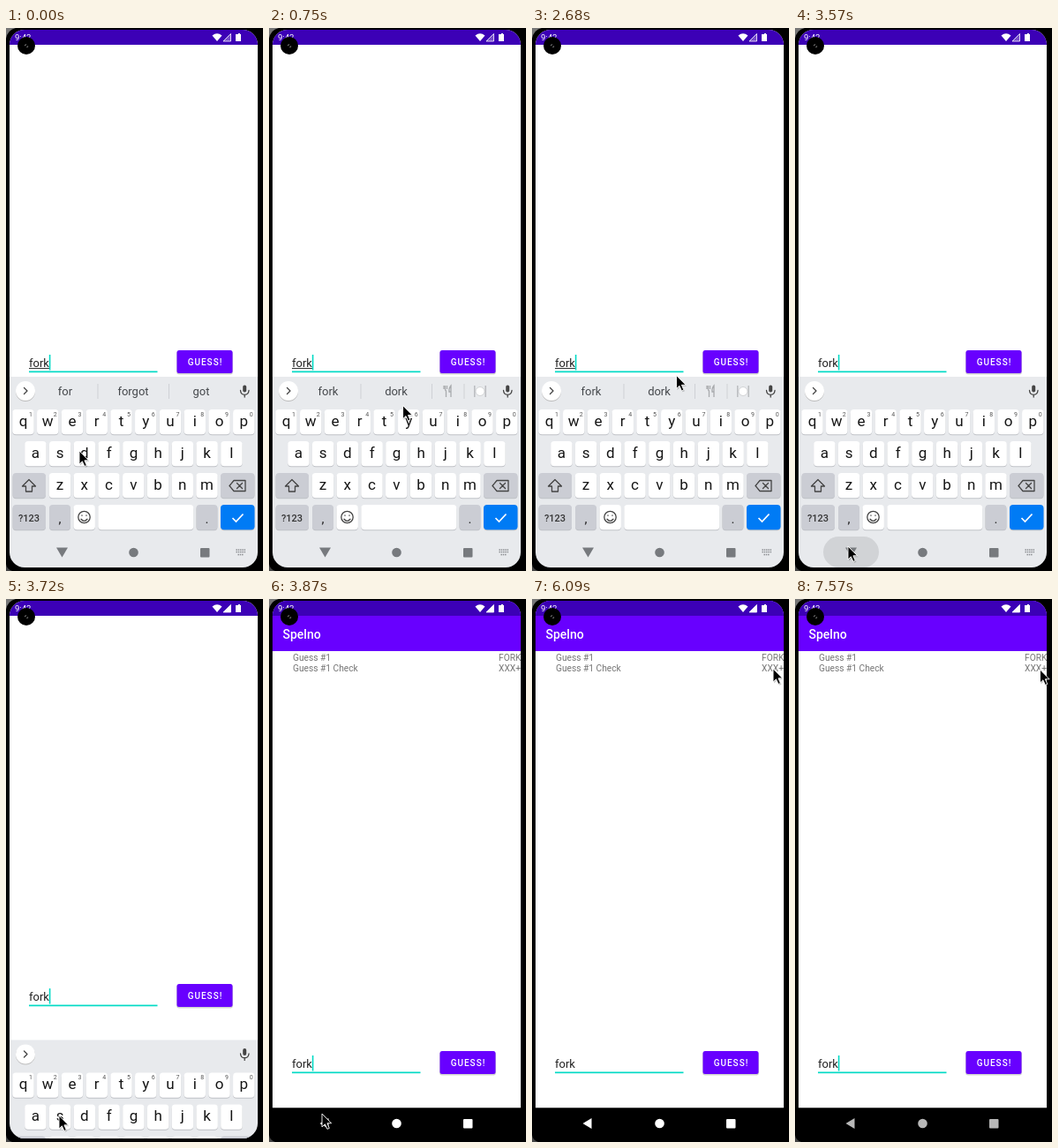
Write an HTML page that moves like this. It is 291 px wide and 615 px high and loops after 8 s.

```html
<!DOCTYPE html>
<html lang="en">
<head>
<meta charset="utf-8">
<title>Word guessing app</title>
<style>
  html, body { margin: 0; width: 100%; height: 100%; overflow: hidden; background: #000; }
  svg { display: block; width: 291px; height: 615px; font-family: Roboto, sans-serif; }
  .mid { text-anchor: middle; }
  .line { fill: none; stroke: #444; stroke-width: 1.3; stroke-linejoin: round; stroke-linecap: round; }
</style>
</head>
<body>
<svg viewBox="0 0 291 615">
  <defs>
    <clipPath id="screen"><rect x="4" y="2" width="281" height="609" rx="17"/></clipPath>
  </defs>
  <rect width="291" height="615"/>
  <path d="M0 0H11Q2 2 0 12Z" fill="#777"/>
  <path d="M0 615V607Q1 613 7 615Z" fill="#444"/>

  <g clip-path="url(#screen)">
    <rect x="4" y="2" width="281" height="574.5" fill="#fff"/>
    <g id="page">
      <rect x="4" y="2" width="281" height="57" fill="#6800ff"/>
      <text x="15.5" y="45" font-size="14" font-weight="500" fill="#fff">Spelno</text>
      <g font-size="10.2" fill="#757575">
        <text x="27" y="70">Guess #1</text>
        <text x="27" y="82">Guess #1 Check</text>
        <text x="260" y="70">FORK</text>
        <text x="260" y="82">XXX+</text>
      </g>
      <text x="26" y="530.5" font-size="13" fill="#222">fork</text>
      <rect id="composing" x="26" y="532" width="23" height="1" fill="#333"/>
      <rect x="26" y="535.5" width="145.5" height="1.7" fill="#03dac5"/>
      <rect id="caret" x="48.8" y="517" width="1.6" height="17.5" fill="#03dac5"/>
      <rect x="193" y="513" width="64" height="26.5" rx="3" fill="#000" opacity=".18"/>
      <rect x="193.5" y="512" width="63" height="26" rx="2.5" fill="#6800ff"/>
      <rect id="press" x="193.5" y="512" width="63" height="26" rx="2.5" fill="#8a1cff"/>
      <text x="225.5" y="529" class="mid" font-size="10" font-weight="500" letter-spacing="1" fill="#fff">GUESS!</text>
    </g>

    <rect x="4" y="576.5" width="281" height="35"/>
    <g id="nav" fill="#fff">
      <path d="M57.5 594L67.5 588V600Z"/>
      <circle cx="144.5" cy="594" r="5.3"/>
      <rect x="220" y="589" width="10.5" height="10.5" rx="1"/>
    </g>

    <g id="keyboard">
      <rect x="4" y="395" width="281" height="216" fill="#e8eaed"/>
      <circle cx="22" cy="412" r="11" fill="#bbb"/>
      <circle cx="22" cy="411" r="11" fill="#fff"/>
      <path d="M20.5 407.5L24 411L20.5 414.5" class="line"/>
      <g id="words"></g>
      <rect x="268.2" y="404.5" width="4" height="8" rx="2" fill="#444"/>
      <path d="M265.5 410.5Q265.8 415.3 270.2 415.3T275 410.5M270.2 415.5V418" class="line"/>
      <g id="keys"></g>
      <rect id="ripple" x="32" y="576" width="63" height="35" rx="17.5" fill="#d1d3d6"/>
      <g fill="#777a7e">
        <path d="M57 588.5H70L63.5 599.5Z"/>
        <circle cx="144.5" cy="594" r="5.3"/>
        <rect x="220" y="589" width="10.5" height="10.5" rx="1"/>
      </g>
      <path d="M260.5 591H271M260.5 593.5H271M262.5 596.5H269" stroke="#85888c" stroke-width="1.4" stroke-dasharray="1.4 .9"/>
    </g>

    <rect x="4" y="2" width="281" height="17" fill="#3c00b6"/>
    <text x="10" y="14" font-size="9.5" fill="#fff">9:42</text>
    <g fill="#fff">
      <path d="M233.5 8.5Q239 4 244.5 8.5L239 15Z"/>
      <path id="signal" d="M246 15L254.5 6.5V15Z" stroke="#fff" stroke-width=".8"/>
      <path d="M261 7H263V6H265V7H266V15H260V7Z"/>
    </g>
  </g>
  <circle cx="23" cy="20" r="10"/>
  <path d="M21 20L23 18.5M23.5 22L25 20.5" stroke="#666" stroke-width="1.3"/>

  <g id="pointer">
    <path d="M1 1.5V16.5L4.5 13.2L7 18.7L9.4 17.7L7 12.2H11.5Z" opacity=".2"/>
    <path d="M0 0V15L3.4 11.8L5.9 17.4L8.3 16.4L5.9 10.8H10.6Z" stroke="#fff" stroke-width=".9"/>
  </g>
</svg>
<script>
const $ = id => document.getElementById(id);
const clamp = v => Math.max(0, Math.min(1, v));
const label = (x, y, size, color, text, extra = '') =>
  `<text class="mid" x="${x}" y="${y}" font-size="${size}" fill="${color}" ${extra}>${text}</text>`;

function key(x, y, width, fill = '#fff') {
  const box = (top, color) =>
    `<rect x="${x}" y="${top}" width="${width}" height="28.3" rx="4" fill="${color}"/>`;
  return box(y + 1, '#bfc1c6') + box(y, fill);
}

function buildKeys() {
  const pitch = 27.75, grey = '#cbcdd4';
  const rows = [['qwertyuiop', 19.5, 432], ['asdfghjkl', 33.4, 468], ['zxcvbnm', 61, 504]];
  let out = '';
  rows.forEach(([letters, start, y], row) => [...letters].forEach((letter, i) => {
    const x = start + i * pitch;
    out += key(x - 12.2, y, 24.4) + label(x, y + 19, 17, '#151515', letter);
    if (row === 0) out += label(x + 8.5, y + 7.5, 7, '#555', (i + 1) % 10);
  }));
  out += key(7.5, 504, 37.5, grey) + key(243, 504, 38.5, grey) + key(7.5, 540, 37.5, grey)
    + key(49, 540, 24, grey) + key(76.5, 540, 24.4) + key(104.3, 540, 108)
    + key(215.5, 540, 24, grey) + key(243, 540, 38.5, '#007bf5');
  out += label(26, 559, 11, '#333', '?123', 'font-weight="500"')
    + label(61, 561, 15, '#222', ',') + label(227.5, 561, 15, '#222', '.');
  out += `<path class="line" d="M26 511.5L18.5 519H22.5V525H29.5V519H33.5Z"/>
    <path class="line" d="M253 518.5L258 512.5H271V524.5H258ZM261.5 515.5L267.5 521.5M267.5 515.5L261.5 521.5"/>
    <circle class="line" cx="88.5" cy="554" r="6.7"/>
    <path class="line" d="M85 556.3Q88.5 560.3 92 556.3M86 552V552.3M91 552V552.3"/>
    <path d="M256.5 555L260.5 559L268.5 550.5" fill="none" stroke="#fff" stroke-width="1.7"/>`;
  return out;
}

const words = list => list.map((word, i) => label(67 + 77 * i, 416, 13, '#45484c', word)).join('');
const dividers = xs => xs.map(x => `<path d="M${x} 403V420" stroke="#cfd1d5"/>`).join('');
const cutlery = `<path d="M199.5 405V408Q199.5 411 200.5 411V418M198 405V409M201.5 405V409M206 418V405Q203.5 408 204 412H206"
    fill="none" stroke="#a9abae" stroke-width="1.3"/>
  <circle cx="239" cy="411.5" r="5" fill="#fff" stroke="#d2d3d5"/>
  <path d="M232.8 405V418M245.2 405V418" stroke="#b4b6b9" stroke-width="1.3"/>`;
const suggestions = {
  typing: words(['for', 'forgot', 'got']) + dividers([104, 184.5]),
  typed: words(['fork', 'dork']) + dividers([104, 184.5, 221]) + cutlery,
  none: ''
};

// Pointer path: time, x, y
const path = [
  [0, 83, 479], [290, 85, 477], [600, 125, 447], [900, 180, 407], [1180, 212, 379], [1340, 214, 375],
  [1490, 210.5, 339], [1780, 208, 311.5], [2340, 208, 311.5], [2700, 160, 400], [3000, 90, 540],
  [3270, 60, 583], [3420, 60, 586], [3570, 60, 587], [3860, 60, 583], [4020, 63, 572],
  [4460, 122, 345], [4750, 160.5, 140], [5100, 215, 95], [5480, 254, 77.5], [5780, 255, 78],
  [6080, 273, 79], [6800, 276, 79], [7150, 277, 75], [7560, 277.5, 80], [8000, 277.5, 80]
];

function pointerAt(t) {
  const i = Math.max(1, path.findIndex(p => p[0] >= t));
  const [t0, x0, y0] = path[i - 1], [t1, x1, y1] = path[i];
  const k = (t - t0) / (t1 - t0);
  return [x0 + (x1 - x0) * k, y0 + (y1 - y0) * k];
}

const step = 148.35;
const hold = t => t < 300 ? 0 : 300 + Math.floor((t - 300) / step) * step;
const show = (id, visible) => $(id).setAttribute('visibility', visible ? 'visible' : 'hidden');
const move = (id, x, y) => $(id).setAttribute('transform', `translate(${x} ${y})`);

let shownWords;
function draw(time) {
  const t = hold(time);
  const closing = clamp((t - 3580) / 270);
  const slide = closing * closing * (3 - 2 * closing);
  move('page', 0, -147 * (1 - slide));
  move('keyboard', 0, 216 * slide);
  move('pointer', ...pointerAt(t));

  const blink = t < 3400 ? t - 280 : t - 3410;
  show('caret', blink < 0 || Math.floor(blink / 500) % 2 === 0);
  show('composing', t < 3400);
  show('ripple', t > 3400);
  $('press').setAttribute('opacity', t < 1180 ? 0 : clamp((1780 - t) / 290));
  $('nav').setAttribute('opacity', 1 - 0.28 * clamp((t - 6500) / 700));
  $('signal').setAttribute('fill-opacity', t < 3700 ? 0.3 : 1);

  const set = t < 300 ? 'typing' : t < 3400 ? 'typed' : 'none';
  if (set !== shownWords) $('words').innerHTML = suggestions[shownWords = set];
}

$('keys').innerHTML = buildKeys();
const start = performance.now();
function tick() {
  draw((performance.now() - start) % 8000);
  requestAnimationFrame(tick);
}
tick();
</script>
</body>
</html>
```
